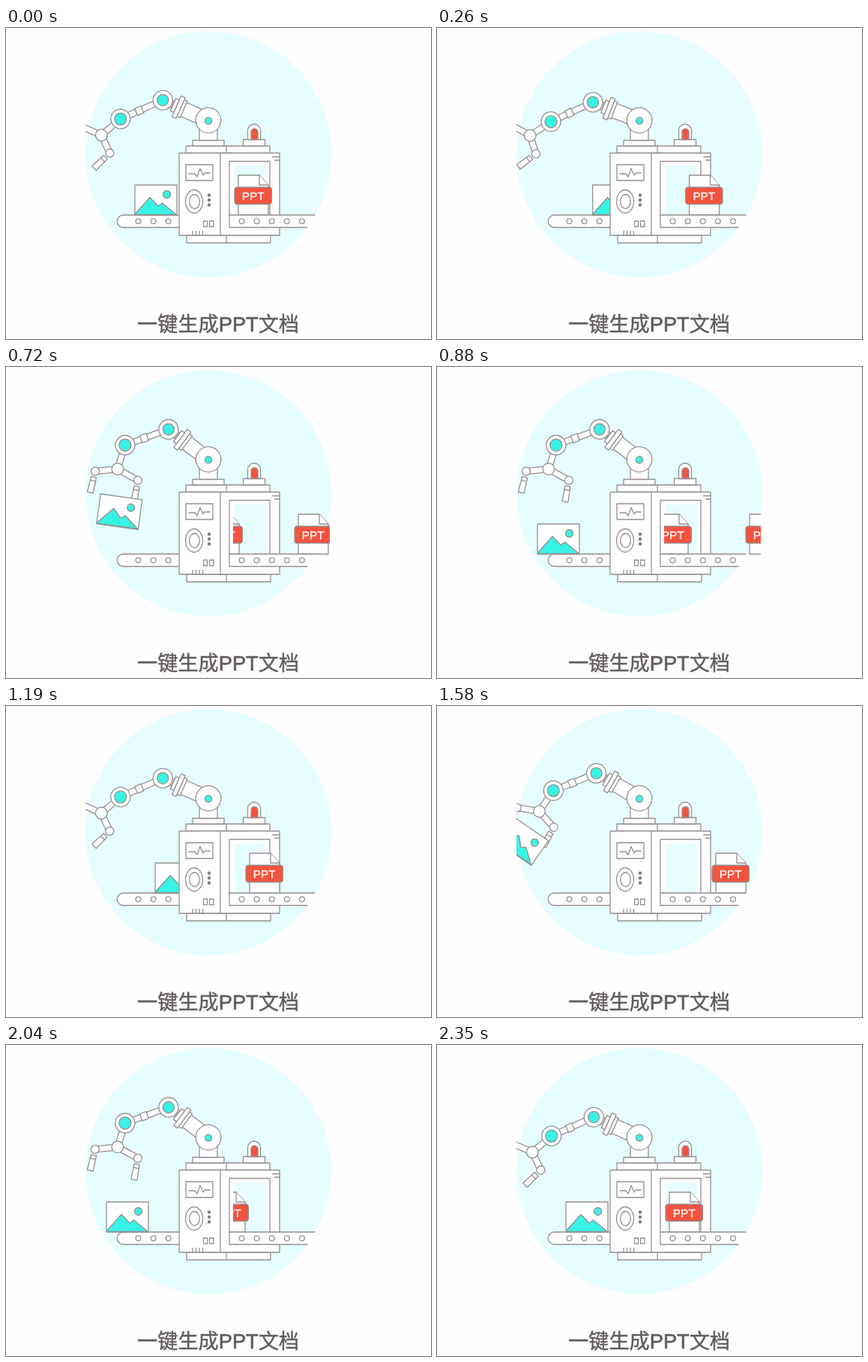
Animation, 567 px wide and 414 px high, one loop 2.43 s. Source, as an HTML page:

```html
<!DOCTYPE html>
<html lang="zh-CN">
<head>
<meta charset="utf-8">
<style>
html, body { margin: 0; width: 100%; height: 100%; overflow: hidden; background: #fefefe; }
svg { display: block; width: 567px; height: 414px; }
.ln { fill: #fff; stroke: #968f91; stroke-width: 1.3; stroke-linejoin: round; stroke-linecap: round; }
.teal { fill: #37f3e5; }
.red { fill: #f4533f; }
.no { fill: none; }
.tag { font: 15.3px "Liberation Sans", Arial, sans-serif; fill: #fff; stroke: #fff; stroke-width: .3; text-anchor: middle; }
.cap { font: 27.2px "Noto Sans CJK SC", "Noto Sans CJK", "Noto Sans CJK JP", sans-serif; fill: #625c5d; stroke: #625c5d; stroke-width: .45; }
.cap tspan { font-family: "Liberation Sans", Arial, sans-serif; stroke-width: .7; }
</style>
</head>
<body>
<svg viewBox="0 0 567 414">
  <defs>
    <clipPath id="stage"><rect x="106" y="4" width="326" height="328"/></clipPath>
    <clipPath id="exit"><rect x="303" y="170" width="129" height="90"/></clipPath>
    <g id="photo">
      <rect class="ln" x="-28" y="-20" width="56" height="40"/>
      <path class="ln teal" d="M-27.3 18L-8 -3.5 3 8 8.5 4 27 19.3H-27.3Z"/>
      <circle class="ln teal" cx="14.5" cy="-7.5" r="5"/>
    </g>
    <g id="doc">
      <path class="ln" d="M5 249V196H33L45 209V249Z"/>
      <path class="ln" d="M33 196V209H45"/>
      <rect class="ln red" y="212" width="49.400" height="22.500" rx="3.500"/>
      <text class="tag" x="24.700" y="228.800">PPT</text>
    </g>
    <g id="claw">
      <path class="ln" d="M-3.5 8H3.5L4 29H-4Z"/>
      <path class="ln" d="M-3.7 13H3.7"/>
    </g>
  </defs>

  <circle cx="270" cy="168" r="164" fill="#e6feff"/>
  <g clip-path="url(#stage)">
    <path class="ln" d="M232 249H156.500A8.250 8.250 0 0 0 156.500 265.500H232Z"/>
    <g id="beltDots"></g>
    <use id="beltPhoto" href="#photo"/>

    <g id="machine">
      <rect class="ln" x="241" y="276" width="112" height="10"/>
      <path class="ln" d="M294 276V286"/>
      <rect class="ln" x="240" y="157" width="112" height="9.500"/>
      <path class="ln" d="M294 157V166"/>
      <rect class="ln" x="249" y="149.500" width="42" height="7.500"/>
      <rect class="ln" x="316.500" y="148.500" width="29" height="8.500"/>
      <path class="ln" d="M322.500 148.500V136.500A8.500 8.500 0 0 1 339.500 136.500V148.500Z"/>
      <path class="ln red" d="M327 148.500V138.500A4.500 4.500 0 0 1 336 138.500V148.500Z"/>
      <rect class="ln" x="231" y="166.500" width="134" height="109.500"/>
      <path class="ln" d="M286 166.500V276M355.500 171.500H365M358.500 176H365M249 270.500V276M253.500 270.500V276M258 270.500V276M262.500 270.500V276"/>
      <rect class="ln" x="240" y="182" width="36" height="21"/>
      <path class="ln no" d="M244 194H252L255 198 259 187 263 196 265 193H272"/>
      <ellipse class="ln" cx="251" cy="231" rx="11.500" ry="15.500"/>
      <ellipse class="ln" cx="251.500" cy="231" rx="6.800" ry="9.500"/>
      <g fill="#857c7e"><circle cx="271" cy="222.500" r="2.200"/><circle cx="271" cy="229" r="2.200"/><circle cx="271" cy="235.500" r="2.200"/></g>
      <rect class="ln" x="263.500" y="257" width="5" height="7.500"/>
      <rect class="ln" x="271.500" y="257" width="5.500" height="7.500"/>
      <rect class="ln" x="298" y="177.500" width="54" height="72"/>
      <rect x="304.500" y="183" width="42.500" height="66" fill="#e6feff"/>
    </g>

    <g clip-path="url(#exit)">
      <use id="docA" href="#doc"/>
      <use id="docB" href="#doc"/>
    </g>
    <path d="M298 249H412V265.500H298Z" fill="#fff"/>
    <path class="ln no" d="M412 249H298V265.500H402"/>
    <g id="outDots"></g>

    <path class="ln" d="M258 149.500V123H282V149.500Z"/>
    <g id="upper">
      <rect class="ln" x="10" y="-10" width="28" height="20"/>
      <rect class="ln" x="52" y="-5" width="8" height="10"/>
      <rect class="ln" x="36" y="-12" width="4.500" height="24"/>
      <rect class="ln" x="40.500" y="-15" width="6" height="30"/>
      <rect class="ln" x="46.500" y="-9" width="5" height="18"/>
    </g>
    <g id="fore">
      <rect class="ln" x="8" y="-4" width="46" height="8"/>
      <rect class="ln" x="30" y="-5" width="9" height="10"/>
    </g>
    <g id="wrist"><rect class="ln" x="8" y="-4" width="22" height="8"/></g>
    <g id="hand">
      <g id="leftFinger">
        <path class="ln" d="M0 -4L-30 -1V7L0 4Z"/>
        <use href="#claw" transform="translate(-30 3) rotate(13)"/>
        <circle class="ln" cx="-30" cy="3" r="5.500"/>
      </g>
      <g id="rightFinger">
        <path class="ln" d="M2 -3.500L29 11.500 25 18.500 -2 3.500Z"/>
        <use href="#claw" transform="translate(27 15) rotate(10)"/>
        <circle class="ln" cx="27" cy="15" r="5.500"/>
      </g>
      <circle class="ln" r="7.800"/>
    </g>
    <circle class="ln" cx="270" cy="123" r="16.800"/>
    <circle class="ln teal" cx="270" cy="123.500" r="4.600"/>
    <g id="elbow"><circle class="ln" r="13"/><circle class="ln teal" r="7.500"/></g>
    <g id="knee"><circle class="ln" r="13"/><circle class="ln teal" r="8"/></g>
    <use id="heldPhoto" href="#photo"/>
  </g>
  <text class="cap" x="175" y="403.500">一键生成<tspan>PPT</tspan>文档</text>
</svg>
<script>
const LOOP = 2430, RAD = Math.PI / 180;
const $ = id => document.getElementById(id);
const mix = (a, b, f) => a + (b - a) * f;

// Tracks are [step, value] pairs, joined by straight lines
const ARM = [[0, 0], [2.5, 0], [4, -.6], [6.5, 1], [12, 1], [14, 0], [17.5, 0], [19, -.6], [21, .48], [22, 1], [28, 1], [30, 0]];
const DOC_A = [[0, 305], [7, 367], [12, 412], [14.2, 433], [15, 433], [15.1, 240], [22, 240], [27, 274], [31, 305]];
const DOC_B = [[7, 250], [12, 290], [16, 320], [21, 367], [27, 433]];
const BELT = [[0, 172], [2.2, 199], [6, 240], [6.1, 134], [12, 134], [16, 199], [19, 240], [19.1, 134], [28.5, 134], [31, 172]];

function track(keys, s) {
  if (s <= keys[0][0]) return keys[0][1];
  for (let i = 1; i < keys.length; i++) {
    const [s0, v0] = keys[i - 1], [s1, v1] = keys[i];
    if (s < s1) return mix(v0, v1, (s - s0) / (s1 - s0));
  }
  return keys[keys.length - 1][1];
}

function dots(id, first, count) {
  for (let i = 0; i < count; i++) {
    const c = document.createElementNS('http://www.w3.org/2000/svg', 'circle');
    c.setAttribute('class', 'ln');
    c.setAttribute('cx', first + i * 20.1);
    c.setAttribute('cy', 257.3);
    c.setAttribute('r', 3.4);
    $(id).appendChild(c);
  }
}

function place(id, p, turn = 0) {
  $(id).setAttribute('transform', `translate(${p[0].toFixed(2)} ${p[1].toFixed(2)}) rotate(${turn.toFixed(2)})`);
}
const show = (id, on) => $(id).setAttribute('visibility', on ? 'visible' : 'hidden');
const reach = (p, len, deg) => [p[0] + len * Math.cos(deg * RAD), p[1] + len * Math.sin(deg * RAD)];

function draw(s) {
  const f = track(ARM, s), back = 1 - f;
  const a1 = mix(203.9, 217, f), a2 = mix(156.1, 160.1, f), a3 = mix(139.9, 107.4, f);
  const turn = 36 * back;
  const shoulder = [270, 123];
  const elbow = reach(shoulder, 66.5, a1);
  const knee = reach(elbow, 61.7, a2);
  const hand = reach(knee, 33.4, a3);
  place('upper', shoulder, a1);
  place('fore', elbow, a2);
  place('wrist', knee, a3);
  place('elbow', elbow);
  place('knee', knee);
  place('hand', hand, turn);
  place('leftFinger', [0, 0], -7 * back);
  place('rightFinger', [-3.9 * back, -2.2 * back]);

  // Carried in the claw, then let fall onto the belt
  const pick = s < 15 ? 4 : 19;
  const drop = Math.min(1, Math.max(0, (s - pick - 4) / 2));
  const held = s >= pick && drop < 1;
  const grip = reach(hand, 45.5, 100.7 + turn);
  const fall = drop * drop;
  place('heldPhoto', [mix(grip[0], 162, drop), mix(grip[1], 229, fall)], mix(15.8 + turn, 0, drop));
  show('heldPhoto', held);

  const x = track(BELT, s);
  place('beltPhoto', [x + 28, 229]);
  show('beltPhoto', s < 6 || (s >= 10 && s < 19) || s >= 25);

  place('docA', [track(DOC_A, s), 0]);
  place('docB', [track(DOC_B, s), 0]);
}

// The picture advances in 32 nearly even steps per loop
function stepAt(t) {
  return t < 568 ? Math.floor((t + 2) / 71.4) : Math.min(31, 8 + Math.floor((t - 568) / 77.4));
}

dots('beltDots', 176.5, 3);
dots('outDots', 314.5, 5);
draw(0);
const start = performance.now();
function tick() {
  draw(stepAt((performance.now() - start) % LOOP));
  requestAnimationFrame(tick);
}
requestAnimationFrame(tick);
</script>
</body>
</html>
```
